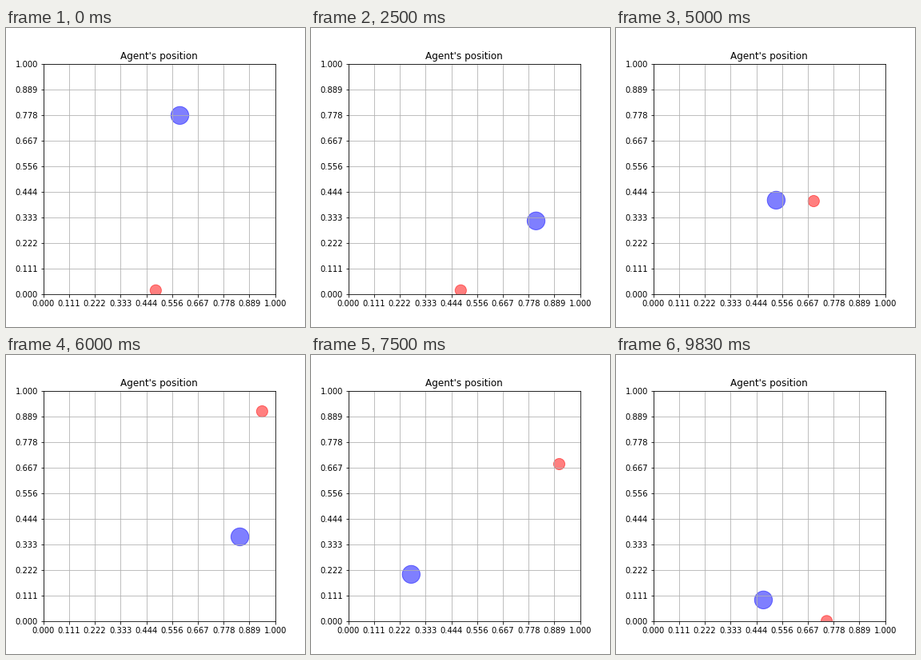
Write a matplotlib script that moves like this. It is 374 px wide and 374 px high and loops after 9.99 s.

```python
import numpy as np
import matplotlib.pyplot as plt
from matplotlib.animation import FuncAnimation

plt.rcParams["text.kerning_factor"] = 6

SIZE, DPI = 374.004, 72
FRAMES, LOOP_MS = 60, 9990
SPEED = 0.085  # distance per step while seeking the goal

# Points are complex numbers x + yj in the unit square.
# Each episode: goal, then the agent's key points by step.
EPISODES = [
    (0.485 + 0.016j, {0: 0.589 + 0.776j, 7: 0.875 + 0.732j,
                      15: 0.810 + 0.318j, 21: 0.603 + 0j}),
    (0.692 + 0.404j, {22: 0.047 + 0.693j, 30: 0.530 + 0.408j}),
    (0.944 + 0.911j, {32: 0.530 + 0.207j, 36: 0.848 + 0.366j}),
    (0.910 + 0.682j, {42: 0.057 + 0.099j, 45: 0.271 + 0.203j,
                      49: 0.344 + 0.300j}),
    (0.748 + 0j, {57: 0.337 + 0.193j, 59: 0.475 + 0.092j}),
]


def agent_at(step, goal, keys):
    """Wander through the key points, then head straight for the goal."""
    last = max(keys)
    pos = np.interp(step, list(keys), list(keys.values()))
    if step > last:
        way = goal - pos
        pos += min((step - last) * SPEED, abs(way)) * way / abs(way)
    return pos


def positions(step):
    """Goal and agent coordinates at a step."""
    goal, keys = [e for e in EPISODES if min(e[1]) <= step][-1]
    return [(p.real, p.imag) for p in (goal, agent_at(step, goal, keys))]


fig = plt.figure(figsize=(SIZE / DPI, SIZE / DPI), dpi=DPI, facecolor="white")
ax = fig.add_axes([0.125, 0.11, 0.775, 0.77])
ax.set_title("Agent's position")
ticks = np.linspace(0, 1, 10)
labels = [f"{t:.3f}" for t in ticks]
ax.set_xticks(ticks, labels)
ax.set_yticks(ticks, labels)
ax.set(xlim=(0, 1), ylim=(0, 1))
ax.grid(True)

dots = ax.scatter(*zip(*positions(0)), s=[200, 500], c=["red", "blue"],
                  alpha=0.5)


def update(step):
    dots.set_offsets(positions(step))
    return dots,


anim = FuncAnimation(fig, update, frames=FRAMES, interval=LOOP_MS / FRAMES,
                     repeat=True, repeat_delay=0, blit=False)
plt.show()
```
